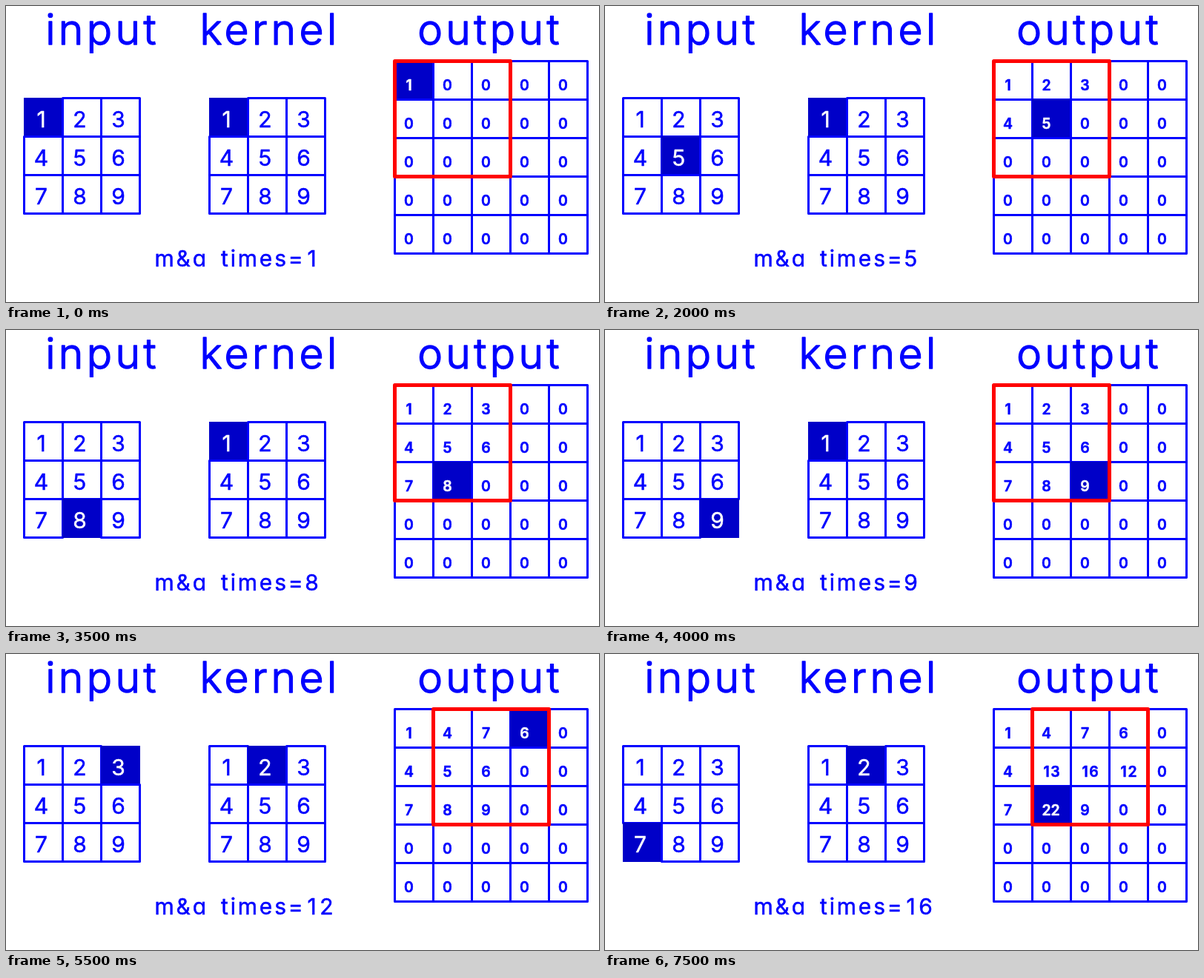
Animation of 800x400 px, one loop 8000 ms. Source, as an HTML page:

```html
<!DOCTYPE html>
<html lang="en">
<head>
<meta charset="utf-8">
<title>Convolution steps</title>
<style>
  html, body { margin: 0; width: 100%; height: 100%; overflow: hidden; background: #fff; }
  svg { display: block; }
  /* A thin outline with round joins softens the letter ends. */
  text {
    font-family: Inter, Roboto, sans-serif;
    font-feature-settings: "cv11"; /* single-storey a */
    fill: #00f;
    stroke: #00f;
    stroke-width: .5;
    stroke-linejoin: round;
    text-anchor: middle;
    white-space: pre;
  }
  .title { font-size: 57px; font-weight: 300; letter-spacing: 4.4px; stroke-width: 1.4; }
  .label { font-size: 30px; letter-spacing: 2.8px; word-spacing: 6px; text-anchor: start; }
  .big { font-size: 30px; }
  .small { font-size: 19.5px; font-weight: 600; }
  .on { fill: #fff; stroke: #fff; }
  rect { fill: none; stroke: #00f; stroke-width: 3; stroke-linejoin: round; }
  .hot { fill: #0000c8; stroke: none; }
  .window { stroke: #f00; stroke-width: 5; }
</style>
</head>
<body>
<svg id="stage" width="800" height="400" viewBox="0 0 800 400"></svg>
<script>
const CELL = 52, STEP_MS = 500, STEPS = 16;
const matrix = [1, 2, 3, 4, 5, 6, 7, 8, 9];
const stage = document.getElementById('stage');

const text = (x, y, style, s) => `<text x="${x}" y="${y}" class="${style}">${s}</text>`;

// Digits sit on a fixed pitch; x is the centre of the first one.
const number = (x, y, pitch, style, n) =>
  [...String(n)].map((d, i) => text(x + i * pitch, y, style, d)).join('');

const box = (x, y, size, style = '') =>
  `<rect x="${x + .5}" y="${y + .5}" width="${size}" height="${size}" class="${style}"/>`;

const hotBox = (x, y) =>
  `<rect x="${x}" y="${y}" width="${CELL + 1}" height="${CELL + 1}" class="hot"/>`;

function grid(left, top, cols, values, hot, small) {
  return values.map((v, i) => {
    const x = left + i % cols * CELL;
    const y = top + Math.floor(i / cols) * CELL;
    const on = i === hot;
    const style = (small ? 'small' : 'big') + (on ? ' on' : '');
    return (on ? hotBox(x, y) : box(x, y, CELL)) +
      number(x + (small ? 19.5 : 23.5), y + 40, small ? 12 : 20, style, v);
  }).join('');
}

// Output cell written by one multiply-and-add step.
function target(step) {
  const k = Math.floor(step / 9), i = step % 9;
  const row = Math.floor(k / 3) + Math.floor(i / 3);
  return row * 5 + k % 3 + i % 3;
}

function render(step) {
  const output = Array(25).fill(0);
  for (let s = 0; s <= step; s++)
    output[target(s)] += matrix[s % 9] * matrix[Math.floor(s / 9)];
  const k = Math.floor(step / 9);

  stage.innerHTML =
    text(130, 52, 'title', 'input') +
    text(356, 52, 'title', 'kernel') +
    text(653, 52, 'title', 'output') +
    grid(24, 124, 3, matrix, step % 9) +
    grid(274, 124, 3, matrix, k) +
    grid(524, 74, 5, output, target(step), true) +
    box(524 + k % 3 * CELL, 74 + Math.floor(k / 3) * CELL, 3 * CELL, 'window') +
    text(200.5, 352, 'label', 'm&amp;a times=') +
    number(412.5, 352, 20, 'big', step + 1);
}

let shown = -1;
const start = performance.now();
function tick() {
  const step = Math.floor((performance.now() - start) / STEP_MS) % STEPS;
  if (step !== shown) render(shown = step);
  requestAnimationFrame(tick);
}
tick();
</script>
</body>
</html>
```
